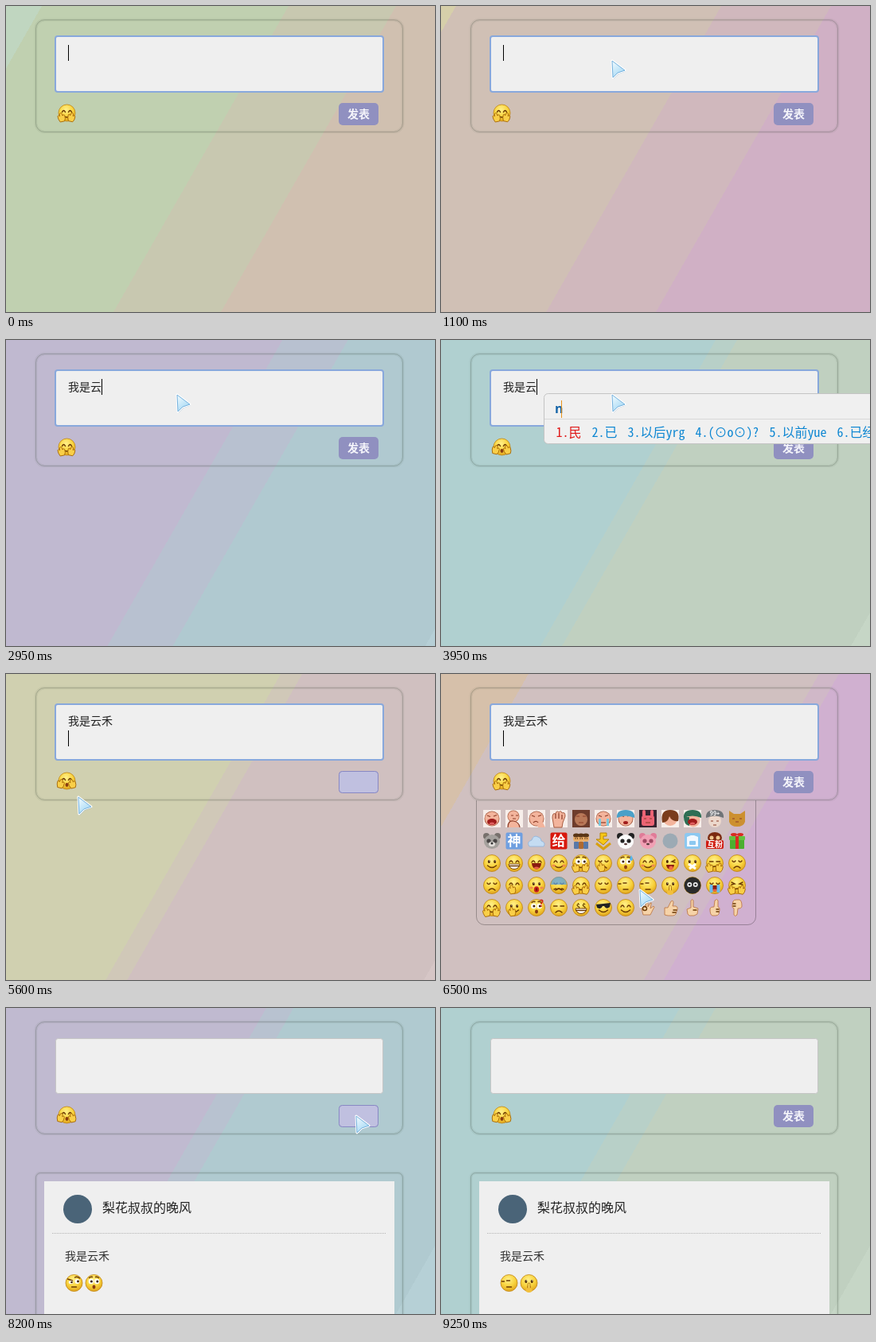
Write an HTML page that moves like this. It is 539x385 px and loops after 9300 ms.

```html
<!DOCTYPE html>
<html lang="zh-CN">
<head>
<meta charset="utf-8">
<title>Comment box</title>
<style>
html, body { margin: 0; width: 100%; height: 100%; overflow: hidden; }
svg { display: block; }
text { font-family: "Noto Sans CJK SC", "Noto Sans CJK", "Noto Sans", sans-serif; }
.cand { font: 300 16px "Noto Sans Mono CJK SC", "Noto Sans CJK SC", "Noto Sans Mono", monospace; }
.code { font: bold 16px "Noto Sans", "Open Sans", sans-serif; fill: #1464a8; }
.odd .b, svg:not(.odd) .a, .open .shut, svg:not(.open) .hug { display: none; }
.line { fill: none; stroke: #6b3a05; stroke-width: 1.4; stroke-linecap: round; }
.skin { fill: #f6d3a8; stroke: #b9703c; stroke-width: .8; }
.palm { fill: #f9cf48; stroke: #a86a08; stroke-width: .8; stroke-linejoin: round; }
</style>
</head>
<body>
<svg id="stage" width="539" height="385" viewBox="0 0 539 385"></svg>
<script>
const LOOP = 9300, NS = 759;
const stage = document.getElementById('stage');
const $ = id => document.getElementById(id);
const at = (x, y, s, cls = '') => `<g class="${cls}" transform="translate(${x} ${y})">${s}</g>`;
const line = d => `<path class="line" d="${d}"/>`;
const shape = (d, fill, more = '') => `<path d="${d}" fill="${fill}" ${more}/>`;
const dot = (x, y, r, fill, ry = r) => `<ellipse cx="${x}" cy="${y}" rx="${r}" ry="${ry}" fill="${fill}"/>`;
const box = (x, y, w, h, fill, r = 0, more = '') =>
  `<rect x="${x}" y="${y}" width="${w}" height="${h}" rx="${r}" fill="${fill}" ${more}/>`;
const label = (x, y, size, s, fill, more = '') =>
  `<text x="${x}" y="${y}" font-size="${size}" fill="${fill}" ${more}>${s}</text>`;
const MID = 'text-anchor="middle" font-weight="bold"';
const heart = (x, y, k) =>
  `<g transform="translate(${x} ${y}) scale(${k})">${shape('M0 4C-9-2-4-7 0-3C4-7 9-2 0 4z', '#e02a1c')}</g>`;
const palm = (x, y, r) => `<g transform="translate(${x} ${y}) rotate(${r}) scale(1.1)">
  <path class="palm" d="M-3 4q-2-4-1.500-7q1.500-2 2.200.5q.3-4 2-3.500t1.300 3.500q1.500-2 2.500 0q.5 4-1.500 6.500z"/></g>`;
const pair = f => f(-3.7) + f(3.7);

const eyes = {
  o: pair(x => dot(x, -2, 1.5, '#4a2604', 2.1) + dot(x + .4, -3, .6, '#fff')),
  u: line('M-6-1q2-4 4 0M2-1q2-4 4 0'),
  '-': line('M-6.500-2h4.500M2-2h4.500'),
  v: line('M-6-3q2 3 4 0M2-3q2 3 4 0'),
  b: pair(x => dot(x, -2, 3.2, '#fff') + dot(x + .6, -2, 1.5, '#402004')) + line('M-6-6.500q2-2 4-1M2-7.500q2-1 4 1'),
  g: shape('M-9-4l18-2l-1 5q-4 4-7-1h-2q-2 5-7 2z', '#222'),
  $: pair(x => label(x, 1.5, 9, '$', '#6a4600', MID)),
  h: heart(-4, -2, .75) + heart(4, -2, .75),
  w: dot(-3.7, -2, 1.5, '#4a2604', 2) + line('M6-4l-4 2l4 1'),
  s: line('M-8-5l6 2M1-7q3-2 6 1') + dot(-4, -1, 2.8, '#fff', 2) + dot(4, -2, 3, '#fff') + dot(-3, -1, 1.3, '#402004') + dot(5, -2, 1.4, '#402004'),
  l: line('M-9-2h3M-3-3h4'),
  a: line('M-7-4l4 2l-4 1M7-4l-4 2l4 1')
};
const mouths = {
  s: line('M-5.500 3q5.500 5 11 0'),
  l: shape('M-6 0h12a6 7.500 0 0 1-12 0z', '#8a1c10') + dot(0, 6, 3, '#e86048', 1.5),
  g: shape('M-7 1h14a7 6.500 0 0 1-14 0z', '#fff', 'stroke="#7a4405"') + line('M-6 3.500h12'),
  n: line('M-4 6q4-4 8 0'),
  '-': line('M-3 5h6'),
  o: dot(0, 5, 2, '#8a3c10', 2.4),
  k: dot(0, 5, 3.2, '#c8201c', 3.8) + dot(0, 5, 1.2, '#7a1010', 2),
  x: '<path d="M-5 1l9 6M4 1l-8 6" stroke="#fff" stroke-width="3"/>',
  t: shape('M-5 2h10a5 5.500 0 0 1-10 0z', '#8a1c10') + dot(1, 6, 2.6, '#f06848')
};
const extras = {
  '.': '',
  c: dot(-6.500, 3, 2.2, '#f08a4a', 1.5) + dot(6.500, 3, 2.2, '#f08a4a', 1.5),
  H: palm(-6, 6.500, -12) + palm(6, 6.500, 12),
  W: palm(-7.500, 4.500, 14) + palm(7.500, 4.500, -14),
  P: palm(-2, 6, -10),
  d: shape('M7-10q-4 7 0 7t0-7z', '#55b4ee'),
  t: box(-6.500, -1, 4, 10, '#68bcf0', 1) + box(2.500, -1, 4, 10, '#68bcf0', 1),
  F: box(-1.500, 0, 3, 8, '#f9d95a', 1.5, 'stroke="#a06008" stroke-width=".7"') + dot(0, 9, 4, '#f2bf3c', 3),
  B: shape('M-10-1a10 10 0 0 1 20 0z', '#5a9fe0', 'opacity=".75"') + line('M-6 5l2-1l2 1l2-1l2 1l2-1l2 1'),
  '?': label(6, -1, 12, '?', '#d02818', MID),
  R: heart(0, 1, 2.1),
  K: dot(0, 0, 10.5, '#2b2b2b') + pair(x => dot(x, -1, 3, '#eee') + dot(x, -1, 1.3, '#222'))
};
const face = ([e, m, x]) => (x == 'R' ? '' :
  '<circle r="10.500" fill="url(#yellow)" stroke="#c08510" stroke-width=".8"/>' + eyes[e] + mouths[m]) + extras[x];
// "A/B" codes alternate between two looks
const flip = (code, x, y) => {
  const [a, b = a] = code.split('/');
  return at(x, y, face(a), 'a') + at(x, y, face(b), 'b');
};

const PICKS = ['l-./s-.', 'ooF/bo.'];
const faceRows = [
  'os. ug. ul. usc bsH vnP bod usc wt./us. ox. -nH vn./osR',
  `vn. uoP okc vnB usH v-./bo. l-./s-. ${PICKS.join(' ')} osK vlt/bo. anH`,
  'usH/uoW osP bo?/vn. -n./-o. $g. gs. us./hs.'
];
const thumb = `<path class="skin" d="M-7 0h4l4-8q3-2 3 2l-1 4h4q3 1 2 4l-2 6q-1 2-4 2h-6l-4-1z"/>${line('M4 3h4M3 6h4')}`;
const upright = '<path class="skin" d="M-6 2q0-3 5-3l1-8q3-3 4 0v8q3 1 2 4l-1 5q-1 2-4 2h-4q-3-1-3-8z"/>' + line('M2 2h3M2 5h3');
const hands = [
  '<path class="skin" d="M-6 9l-2-8q-1-4 3-3l2 2l1-8q2-2 2 1v6l3-5q2-1 1 2l-1 5l4-3q2 1 0 3l-4 8z"/><circle class="line" cx="-4" cy="1" r="2.500"/>',
  thumb,
  '<path class="skin" d="M-6 8l-1-6l5-2v-9q2-3 3 0v8l6 2l-1 7l-4 2h-6z"/>' + line('M1 3h4'),
  upright,
  `<g transform="rotate(180)">${upright}</g>`
];

const SKIN = '#f3b49c';
const ink = d => `<path d="${d}" fill="none" stroke="#8c3c28" stroke-width="1.200"/>`;
const squint = ink('M-6-4l4 1.500M2-3l4-1.500');
const mug = (mouth, hat = '') => dot(0, 0, 9.5, '#a85c40', 9.5) + dot(0, 0, 8.7, SKIN) + squint + mouth + hat;
const lean = x => dot(x, -3, 7.5, '#a85c40') + dot(x, -3, 6.8, SKIN) + shape('M-8 11q0-9 7-8t8 8z', SKIN) + ink('M-4-4h3M2-4h3M-2 0h4M-8 11q0-9 7-8t8 8');
const roar = dot(0, 4, 6, '#a01c1c', 4) + dot(0, 6, 3, '#e06060', 1.5);
const cap = c => shape('M-11-1q-1-10 11-10t11 10q-11-5-22 0z', c);
const memes = [
  mug(roar), lean(-1), mug(ink('M-4 5q4-4 8 2'), shape('M2 11q-3-8 5-8l4 8z', SKIN)),
  shape('M-6 11l-2-12q0-7 4-5q1-5 4-2q3-3 4 1q4-2 4 4l-3 8l-1 6z', SKIN, 'stroke="#a85c40"') + ink('M-4-6v6M0-7v7M4-5v6'),
  box(-11, -11, 22, 22, '#6e3c2c') + dot(0, 1, 8, '#b87858') + ink('M-6-3h4M2-3h4M-3 5h6'),
  mug(ink('M-3 5h6'), box(-6, 0, 3, 9, '#7cc8dc') + box(4, 0, 3, 9, '#7cc8dc')),
  mug(dot(0, 5, 3, '#a01c1c', 2), cap('#4aa0c8')),
  box(-11, -11, 22, 22, '#382430') + box(-8, -4, 16, 13, '#ec6474', 3) + box(-7, -11, 4, 9, '#ec6474', 2) + box(3, -11, 4, 9, '#ec6474', 2) + ink('M-5 0h3M2 0h3M-3 5h6'),
  dot(0, 0, 9, SKIN) + shape('M-10 5q-3-16 10-16t10 14q-8 1-11-6q-2 8-9 8z', '#7a3c1c'),
  dot(1, 2, 8.5, SKIN) + cap('#2e6e54') + shape('M-11-2h7v11q-7-1-7-11z', '#2e6e54') + roar,
  dot(0, 3, 8, '#ecd8cc') + cap('#707478') + ink('M-5 3h3M2 3h3M-2 8h4') + label(0, -4, 7, '99+', '#fff', MID),
  shape('M-10-10l6 4h8l6-4v14q-2 6-10 6t-10-6z', '#cc9030') + ink('M-6 0h3M3 0h3M-2 4h4')
].map((s, i) => (i < 10 ? box(-11, -11, 22, 22, '#f7eeea') : '') +
  `<g class="a">${s}</g><g class="b" transform="scale(-1 1)">${s}</g>`.replace(/scale\(-1 1\)/, i == 10 ? '' : '$&'));

const tile = (a, b, fill, size = 17) => box(-10.500, -10.500, 21, 21, fill, 2) +
  [a, b].map((s, i) => `<g class="${'ab'[i]}">${label(0, size * .37, size, s, '#fff', MID)}</g>`).join('');
const beast = (c, ear, patch) => dot(-7, -6, 4, ear) + dot(7, -6, 4, ear) + dot(0, 1, 10, c, 9) +
  dot(-4, 0, 2.6, patch) + dot(4, 0, 2.6, patch) + dot(0, 4, 2, '#553a3a', 1.3);
const people = [-6, 0, 6].map(x => dot(x, -3, 4, '#e8ac66') + box(x - 3, 1, 6, 9, x ? '#5878a8' : '#b06a30', 1) +
  dot(x, -7, 4, '#5a3616', 2.5) + dot(x - 1, -3, .7, '#402004') + dot(x + 1.500, -3, .7, '#402004')).join('');
const things = [
  beast('#a4a09c', '#77706c', '#484444') + dot(0, 4, 4, '#e4e0dc', 3) + dot(0, 3, 1.5, '#333'),
  tile('神', '马', '#6f9fe0'),
  shape('M-9 7q-4-6 3-8q2-7 8-4q4 1 4 5q6 2 3 7z', '#c4dcf2', 'stroke="#98b8dc"'),
  tile('给', '力', '#d8180c'),
  people,
  shape('M-4-10h8v4h-4v4h7l-7 7l-9-7h5z', '#f6c818', 'stroke="#b88406"') + shape('M-9 3l9 7l9-7', 'none', 'stroke="#d8a010" stroke-width="3"'),
  beast('#fafafa', '#222', '#222'),
  beast('#f0a0b4', '#e07c98', '#a04a64'),
  dot(0, 0, 9.5, '#9caab4'),
  box(-10, -10, 20, 20, '#8cc8f0', 3) + shape('M-7-5l5-2h4l5 2v12h-14z', '#f2f8fe') + box(-4, 0, 8, 5, '#8cc8f0', 1),
  dot(0, -4, 9, '#7c2a10', 7) + dot(-4, -4, 2.5, '#f0c890') + dot(4, -4, 2.5, '#f0c890') + box(-11, -1, 22, 11, '#d01c10', 2) + label(0, 8, 10, '互粉', '#fff', MID),
  box(-9, -3, 18, 13, '#4caf30', 1) + box(-10, -6, 20, 5, '#64c040', 1) + box(-2, -6, 4, 16, '#d82c20') + dot(-4, -8, 4, '#d82c20', 2) + dot(4, -8, 4, '#d82c20', 2)
];

const col = i => 64 + 28 * i, row = j => 182 + 28 * j;
const iconRow = (list, j, first = 0) => list.map((s, i) => at(col(i + first), row(j), s)).join('');
const panel = '<rect id="sheet" x="44.500" y="140" width="351" rx="10" fill="none" stroke="#000" stroke-opacity=".27"/>' +
  iconRow(memes, 0) + iconRow(things, 1) + iconRow(hands, 4, 7) +
  faceRows.map((r, j) => r.split(' ').map((c, i) => flip(c, col(i), row(j + 2))).join('')).join('');

const frame = (x, y, w, h, r) => [[4, .05], [1, .2]].map(([sw, o]) =>
  box(x, y, w, h, 'none', r, `stroke="#203020" stroke-width="${sw}" stroke-opacity="${o}"`)).join('');
const picks = (x, y) => PICKS.map((c, i) => `<g data-pick="${i}">${flip(c, x + 25 * i, y)}</g>`).join('');

stage.innerHTML = `<defs>
  <radialGradient id="yellow" cx=".45" cy=".3" r=".75"><stop stop-color="#fff08a"/><stop offset=".55" stop-color="#f8d23c"/><stop offset="1" stop-color="#dc9c18"/></radialGradient>
  <linearGradient id="ice" x2=".6" y2="1"><stop stop-color="#f4fcff"/><stop offset="1" stop-color="#a4d8f4"/></linearGradient>
  <linearGradient id="sky" gradientUnits="userSpaceOnUse" x2="572.2" y2="327">${'<stop/>'.repeat(10)}</linearGradient>
  <clipPath id="roll"><rect id="rollBox" x="40" y="159" width="362"/></clipPath></defs>
  ${box(0, 0, 539, 385, 'url(#sky)')}
  <g clip-path="url(#roll)">${panel}</g>
  ${frame(37.5, 17.5, 461, 141, 11)}
  <rect id="field" fill="#efefef" rx="3"/>
  ${label(78, 64, 14, '', '#222', 'id="typed"')}
  <g id="inserted">${picks(89.5, 81)}</g>
  <g id="bar">${box(456, 40, 17, 67, '#e9e9e9')}${box(458, 56, 13, 34, '#b0b0b0')}
    ${shape('M460.500 50l4-4l4 4z', '#a0a0a0')}${shape('M460.500 96l4 4l4-4z', '#444')}</g>
  <rect id="caret" width="1" fill="#000"/>
  ${at(76.5, 134.5, face('usH'), 'hug')}${at(76.5, 134.5, face('uoW'), 'shut')}
  ${box(418, 122, 50, 28, '#9090c0', 5)}${label(443, 141, 14, '发表', '#f4f4fa', MID)}
  <g id="hover">${box(418.5, 122.5, 49, 27, '#c0c0e0', 4, 'stroke="#8888c4"')}</g>
  <g id="post">${frame(37.5, 207.5, 461, 220, 6)}${box(48, 218, 440, 200, '#efefef')}
    ${dot(90, 253, 18, '#4a6478')}${label(121, 257, 16, '梨花叔叔的晚风', '#222')}
    <path d="M58 283.500h420" stroke="#b4b4b4" stroke-dasharray="1 1"/>
    ${label(74, 317, 14, '我是云禾', '#333')}${picks(85.5, 346)}</g>
  <g id="ime"></g>
  <g id="mouse"><path d="M0 0l1 21l6-6l9-3z" transform="translate(1 1.500)" fill="#3c78b0" opacity=".45"/>
    <path d="M0 0l1 21l6-6l9-3z" fill="url(#ice)" stroke="#fff" stroke-width="3" stroke-linejoin="round"/>
    <path d="M0 0l1 21l6-6l9-3z" fill="url(#ice)" stroke="#74b0dc" stroke-linejoin="round"/></g>`;

// time, hue, left corner edge, band start, band end, right corner edge
const skyKeys = [
  [0, 90, 45, 355, 490, 759], [1900, -30, 0, 350, 490, 759], [3950, -180, 0, 345, 372, 735],
  [5600, -300, 0, 345, 372, 745], [6500, -360, 110, 475, 500, 759], [7500, -420, 0, 345, 372, 710],
  [9250, -540, 0, 300, 345, 710], [9300, -543, 0, 300, 345, 710]
];
const mouseKeys = [
  [50, 365, 138], [900, 215, 69], [4950, 215, 69], [5600, 91, 155], [5850, 72, 133], [6100, 72, 133],
  [6500, 250, 272], [6700, 256, 266], [6800, 256, 266], [7000, 285, 266], [7100, 285, 266],
  [7500, 428, 165], [7700, 440, 136], [9300, 440, 136]
];
const hoverKeys = [[5350, 0], [5550, 1], [5650, 1], [5850, 0], [7600, 0], [7750, 1], [8800, 1], [9000, 0]];
const rollKeys = [[5950, 0], [6250, 160], [7850, 160], [8100, 0]];
const sheetKeys = [[6900, 175.5], [7000, 166.5]];
const postKeys = [[7900, 0], [8200, 1]];

// time, text, caret x, caret y, code, candidates
const edits = [
  [0, '', 78, 49],
  [1650, '', 78, 49, 'q', '我 金 我们wu 钱的grq 多少qqi 然后rg'],
  [1800, '我', 92, 49],
  [1850, '我', 92, 49, 'j', '是 日 是的grq 是啊gkb 明天egd 是不是gi'],
  [2450, '我是', 106, 49, 'f', '地 二 土地fbg 城市ymh 云南fmu 坏了bnh'],
  [2600, '我是', 106, 49, 'fc', '云 去 支持rff 运动fcl 动力lt 却是jg'],
  [2800, '我是云', 120, 49],
  [3700, '我是云', 120, 49, 'n', '民 已 以后yrg (⊙o⊙)? 以前yue 已经xc'],
  [4350, '我是云禾', 134, 49],
  [4650, '我是云禾', 78, 71],
  [5100, '我是云禾', 78, 71],
  [6700, '我是云禾', 102, 71],
  [7000, '我是云禾', 125, 71],
  [7850, '', 78, 49]
];

function tween(keys, t) {
  const i = keys.findIndex(k => k[0] > t);
  if (i < 1) return (i ? keys[keys.length - 1] : keys[0]).slice(1);
  const a = keys[i - 1], b = keys[i], p = (t - a[0]) / (b[0] - a[0]);
  return a.slice(1).map((v, n) => v + (b[n + 1] - v) * p);
}

const steps = [1, 1, 1, 0, 0, -1, -1, -1, 0, 0, 1, 1];
const channel = (h, depth) => {
  const x = ((h % 360 + 360) % 360) / 30, i = Math.floor(x), p = x - i;
  return 192 + depth * (steps[i % 12] * (1 - p) + steps[(i + 1) % 12] * p);
};
const tint = (h, depth = 16) => [0, -120, 120].map(d => channel(h + d, depth));

function paintSky(t) {
  const [hue, ...edges] = tween(skyKeys, t);
  const left = tint(hue), right = tint(hue - 60);
  const colors = [tint(hue + 30, 22), left, left.map((v, i) => (v + right[i]) / 2), right, right.map(v => v + 6)];
  const marks = [0, ...edges, NS];
  $('sky').querySelectorAll('stop').forEach((s, i) => {
    s.setAttribute('offset', marks[(i + 1) >> 1] / NS);
    s.setAttribute('stop-color', `rgb(${colors[i >> 1].map(Math.round)})`);
  });
}

function imeMarkup([, , cx, , code, words]) {
  if (!code) return '';
  const x = cx + 9;
  let left = x + 15.5;
  const list = words.split(' ').map((w, i) => {
    const s = `${i + 1}.${w}`, from = left;
    left += [...s].reduce((n, c) => n + (c.charCodeAt() < 256 ? 8 : 16), 13);
    return `<text class="cand" x="${from}" y="122" fill="${i ? '#0c86d2' : '#e01818'}">${s}</text>`;
  }).join('');
  return box(x + .5, 67.5, 600, 63, '#f0f0f0', 5, 'stroke="#c4c4c4"') +
    `<path d="M${x + 1} 99.500h600" stroke="#d8d8d8"/><text class="code" x="${x + 14}" y="92">${code}</text>` +
    box(x + 12 + 10 * code.length, 76, 1, 22, '#e8941c') + list;
}

const show = (el, on) => { el.style.display = on ? '' : 'none'; };
let last;
function draw() {
  const t = performance.now() % LOOP;
  paintSky(t);
  const edit = edits.filter(e => e[0] <= t).pop();
  if (edit !== last) {
    last = edit;
    $('typed').textContent = edit[1];
    $('caret').setAttribute('x', edit[2]);
    $('caret').setAttribute('y', edit[3]);
    $('ime').innerHTML = imeMarkup(edit);
  }
  const focus = t < 7850, d = focus ? 0 : .5;
  const field = { x: 62 + d, y: 38 + d, width: 412 - 2 * d, height: 70 - 2 * d, stroke: focus ? '#88a8dc' : '#c6c6c6', 'stroke-width': focus ? 2 : 1 };
  for (const k in field) $('field').setAttribute(k, field[k]);
  const count = focus ? (t >= 6700) + (t >= 7000) : 0;
  $('caret').setAttribute('height', count ? 25 : 20);
  show($('caret'), focus && Math.floor((t - edit[0]) / 530) % 2 == 0);
  $('inserted').querySelectorAll('[data-pick]').forEach((g, i) => show(g, i < count));
  show($('bar'), count);
  stage.classList.toggle('odd', Math.floor(t * 3 / 1000) % 2 == 1);
  stage.classList.toggle('open', [0, 3].includes(Math.floor(t / 150) % 4));

  $('rollBox').setAttribute('height', tween(rollKeys, t)[0]);
  $('sheet').setAttribute('height', tween(sheetKeys, t)[0]);
  $('hover').setAttribute('opacity', tween(hoverKeys, t)[0]);
  $('post').setAttribute('opacity', tween(postKeys, t)[0]);
  const [x, y] = tween(mouseKeys, t);
  $('mouse').setAttribute('transform', `translate(${x} ${y})`);
  show($('mouse'), t >= 50 && t < 8780);
  requestAnimationFrame(draw);
}
draw();
</script>
</body>
</html>
```
